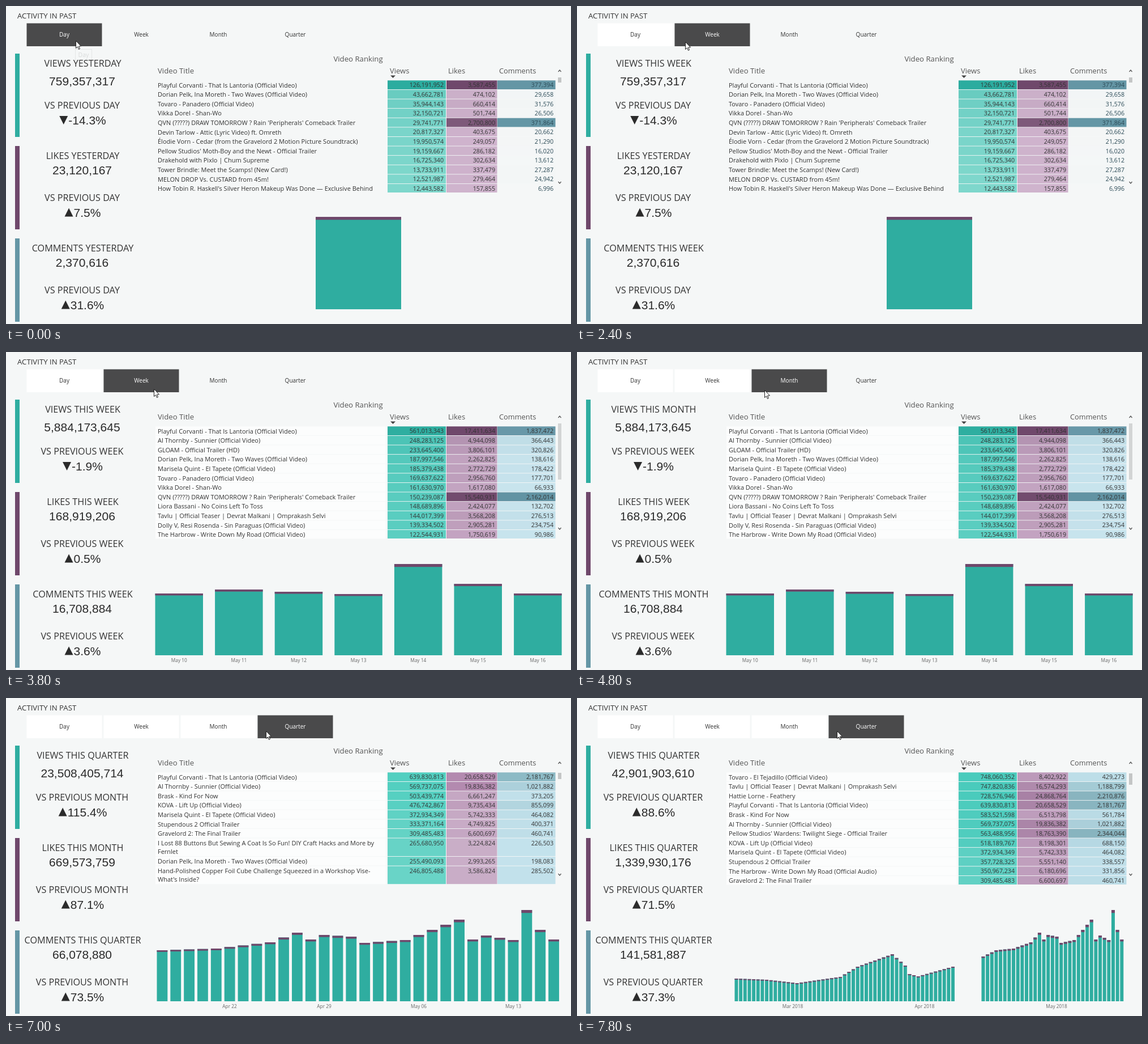
An HTML page with a canvas that plays this animation: 998x561 px, repeating every 8.2 s.

```html
<!DOCTYPE html>
<html lang="en">
<head>
<meta charset="utf-8">
<title>Video activity dashboard</title>
<style>
html, body { margin: 0; width: 100%; height: 100%; overflow: hidden; background: #f5f7f7; }
canvas { display: block; }
</style>
</head>
<body>
<canvas id="stage" width="998" height="561"></canvas>
<script>
const ctx = document.getElementById('stage').getContext('2d');
const LOOP = 8200, STEP = 200;
const UI = '"Open Sans", "Noto Sans", sans-serif';
const NUM = '"Liberation Sans", Arial, sans-serif';
const TEAL = '#2fada0', PLUM = '#6f486b', BLUE = '#6496a5';
const BASE = 535;

const song = 'Playful Corvanti - That Is Lantoria (Official Video)';
const waves = 'Dorian Pelk, Ina Moreth - Two Waves (Official Video)';
const band = "QVN (?????) DRAW TOMORROW ? Rain 'Peripherals' Comeback Trailer";
const sunny = 'Al Thornby - Sunnier (Official Video)';
const rug = 'Marisela Quint - El Tapete (Official Video)';
const teaser = 'Tavlu | Official Teaser | Devrat Malkani | Omprakash Selvi';
const baker = 'Tovaro - Panadero (Official Video)';
const rap = 'Vikka Dorel - Shan-Wo';
const kind = 'Brask - Kind For Now';
const lift = 'KOVA - Lift Up (Official Video)';
const hero = 'Stupendous 2 Official Trailer';

// rows that read the same for the month and the quarter
const songRow = song + ';639830813;20658529;2181767';
const sunnyRow = sunny + ';569737075;19836382;1021882';
const rugRow = rug + ';372934349;5742333;464082';
const lordRow = 'Gravelord 2: The Final Trailer;309485483;6600697;460741';

// each row: title; views; then likes and comments for the leading videos
const views = [
  {
    button: 'Day', period: 'YESTERDAY', prev: 'DAY', thumb: [126, 9],
    totals: ['759,357,317', '23,120,167', '2,370,616'], change: ['▼-14.3%', '▲7.5%', '▲31.6%'],
    shades: [['#80d8cd', '#2bac9f'], ['#d0b5ce', PLUM], ['#f5f7f7', BLUE]],
    rows: `${song};126191952;3587455;377394
${waves};43662781
${baker};35944143
${rap};32150721
${band};29741771;2700800;371864
Devin Tarlow - Attic (Lyric Video) ft. Omreth;20817327
Élodie Vorn - Cedar (from the Gravelord 2 Motion Picture Soundtrack);19950574
Pellow Studios' Moth-Boy and the Newt - Official Trailer;19159667
Drakehold with Pixlo | Chum Supreme;16725340
Tower Brindle: Meet the Scamps! (New Card!);13733911
MELON DROP Vs. CUSTARD from 45m!;12521987
How Tobin R. Haskell's Silver Heron Makeup Was Done — Exclusive Behind;12443582`
  },
  {
    button: 'Week', period: 'THIS WEEK', prev: 'WEEK', thumb: [126, 99],
    totals: ['5,884,173,645', '168,919,206', '16,708,884'], change: ['▼-1.9%', '▲0.5%', '▲3.6%'],
    shades: [['#62d3c6', '#2eaea0'], ['#c5a6c3', PLUM], ['#c8e4ed', '#6293a3']],
    rows: `${song};561013343;17411634;1837472
${sunny};248283125
GLOAM - Official Trailer (HD);233645400
${waves};187997546
${rug};185379438
${baker};169637622
${rap};161630970
${band};150239087;15540931;2162014
Liora Bassani - No Coins Left To Toss;148689896
${teaser};144017399
Dolly V, Resi Rosenda - Sin Paraguas (Official Video);139334502
The Harbrow - Write Down My Road (Official Video);122544931`
  },
  {
    button: 'Month', period: 'THIS MONTH', prev: 'MONTH', thumb: [132, 11],
    totals: ['23,508,405,714', '669,573,759', '66,078,880'], change: ['▲115.4%', '▲87.1%', '▲73.5%'],
    shades: [['#74d6ca', '#52cfc0'], ['#cbb0c9', '#b38aaf'], ['#c5e3ed', '#8dbac5']],
    rows: `${songRow}
${sunnyRow}
${kind};503439774
${lift};476742867
${rugRow}
${hero};333371164
${lordRow}
I Lost 88 Buttons But Sewing A Coat Is So Fun! DIY Craft Hacks and More by/Fernlet;265680950
${waves};255490093
Hand-Polished Copper Foil Cube Challenge Squeezed in a Workshop Vise-/What's Inside?;246805488`
  },
  {
    button: 'Quarter', period: 'THIS QUARTER', prev: 'QUARTER', thumb: [133, 20],
    totals: ['42,901,903,610', '1,339,930,176', '141,581,887'], change: ['▲88.6%', '▲71.5%', '▲37.3%'],
    shades: [['#70d5c9', '#4acbbc'], ['#c3a3c1', '#a881a5'], ['#c2e2ec', '#88b4bf']],
    rows: `Tovaro - El Tejadillo (Official Video);748060352
${teaser};747820836
Hattie Lorne - Feathery;728576946;24868764;2210876
${songRow}
${kind};583521598
${sunnyRow}
Pellow Studios' Wardens: Twilight Siege - Official Trailer;563488956;18763390;2344044
${lift};518189767
${rugRow}
${hero};357728325
The Harbrow - Write Down My Road (Official Audio);350967234
${lordRow}`
  }
];

const random = seed => {
  const n = Math.sin(seed * 12.9898) * 43758.5453;
  return n - Math.floor(n);
};

// missing likes are a seeded share of the views, missing comments a share of the likes
function parseRow(line, seed) {
  const [title, ...given] = line.split(';');
  const [seen, likes = seen * (0.01 + 0.015 * random(seed)),
    comments = likes * (0.04 + 0.05 * random(seed + 0.5))] = given.map(Number);
  return { lines: title.split('/'), counts: [seen, likes, comments].map(Math.round) };
}
views.forEach((v, i) => {
  v.rows = v.rows.split('\n').map((line, n) => parseRow(line, i * 20 + n + 1));
  v.peaks = [0, 1, 2].map(c => Math.max(...v.rows.map(r => r.counts[c])));
});

const cards = [
  { name: 'VIEWS', color: TEAL, y: 84, gap: 48 },
  { name: 'LIKES', color: PLUM, y: 247, gap: 42 },
  { name: 'COMMENTS', color: BLUE, y: 410, gap: 42 }
];
const columns = [[674, 103, 773], [778, 89.5, 864], [868, 102.5, 967]];

// bar tops at the turning points of the 90 days
const trend = [[0, 495], [7, 497], [14, 503], [24, 492], [28, 474], [36, 452], [39, 472], [40, 487], [42, 491],
  [50, 474], [57, 456], [60, 445], [64, 442], [68, 431], [70, 414], [71, 426], [72, 418], [74, 421], [75, 432],
  [78, 427], [82, 391], [83, 426], [84, 419], [86, 427], [87, 374], [88, 409], [89, 426]];
const pointerPath = [[600, 123, 61], [1800, 191, 63], [3200, 191, 63], [4400, 331, 67],
  [5000, 331, 67], [5600, 454, 55], [5800, 459, 58]];

const linear = k => k;
const smooth = k => k * k * (3 - 2 * k);
const stage = (t, marks) => marks.filter(m => t >= m).length;

// value in slot i of the keyed points at position p
function along(points, p, i = 1, ease = linear) {
  const n = points.findIndex(q => q[0] >= p);
  if (n === 0) return points[0][i];
  if (n < 0) return points[points.length - 1][i];
  const a = points[n - 1], b = points[n];
  return a[i] + (b[i] - a[i]) * ease((p - a[0]) / (b[0] - a[0]));
}

function box(x, y, w, h, color) {
  ctx.fillStyle = color;
  ctx.fillRect(x, y, w, h);
}

// y is the middle of the capitals
function text(s, x, y, size, color = '#333', align = 'left', font = UI) {
  ctx.font = size + 'px ' + font;
  ctx.textAlign = align;
  ctx.fillStyle = color;
  ctx.fillText(s, x, y + size * 0.36);
}

function triangle(x, y, w, h) {
  ctx.beginPath();
  ctx.moveTo(x, y);
  ctx.lineTo(x + w, y);
  ctx.lineTo(x + w / 2, y + h);
  ctx.fill();
}

function mix(a, b, k) {
  const part = (c, i) => parseInt(c.slice(1 + 2 * i, 3 + 2 * i), 16);
  return 'rgb(' + [0, 1, 2].map(i => Math.round(part(a, i) + (part(b, i) - part(a, i)) * k)) + ')';
}

function drawButtons(selected, hovered) {
  views.forEach((v, i) => {
    const x = 36.5 + i * 136, on = i === selected, over = i === hovered;
    let fill = i < selected ? '#fff' : '#f5f7f7';
    if (over) fill = '#dfdfe1';
    if (on) fill = over ? '#4a4a4b' : '#2d2d2d';
    box(x, 30.5, 133, 40.5, fill);
    text(v.button, x + 66.5, 50.5, 10, on ? '#fff' : over ? '#555' : '#333', 'center');
  });
}

function drawChange(s, y) {
  const up = s[0] === '▲', label = s.slice(1), mark = 16;
  ctx.font = '21px ' + NUM;
  const x = 135.5 - (mark + ctx.measureText(label).width) / 2;
  text(label, x + mark, y, 21, '#2b2b2b', 'left', NUM);
  triangle(x, y + (up ? 7.5 : -7), 15, up ? -15 : 15);
}

function drawCards(titled, shown) {
  const data = views[shown];
  cards.forEach((c, i) => {
    box(16, c.y, 8, 147, c.color);
    // the likes title is refreshed together with its value
    const period = views[i === 1 ? shown : titled].period;
    text(c.name + ' ' + period, 135.5, c.y + 16.7, 16.2, '#333', 'center');
    text(data.totals[i], 134.5, c.y + c.gap, 21, '#2b2b2b', 'center', NUM);
    text('VS PREVIOUS ' + data.prev, 134.5, c.y + 91.2, 16.2, '#333', 'center');
    drawChange(data.change[i], c.y + 117);
  });
}

function chevron(y, dir) {
  ctx.beginPath();
  ctx.moveTo(975.5, y + 1.5 * dir);
  ctx.lineTo(978, y - 1.5 * dir);
  ctx.lineTo(980.5, y + 1.5 * dir);
  ctx.strokeStyle = '#555';
  ctx.lineWidth = 1.3;
  ctx.stroke();
}

function drawTable(shown) {
  const { rows, shades, thumb, peaks } = views[shown];
  text('Video Ranking', 622, 93, 13.2, '#555', 'center');
  text('Video Title', 268, 114, 13.2, '#555');
  text('Views', 678, 114, 13, '#555');
  text('Likes', 781, 114, 13, '#555');
  text('Comments', 871, 114, 12.8, '#555');
  ctx.fillStyle = '#444';
  triangle(679, 122.5, 9, 4.5);

  let y = 131.3;
  for (const { lines, counts } of rows) {
    const h = lines.length > 1 ? 32.5 : 16.6;
    const mid = y + 8.3;
    if (shown) box(264, y, 407, h - 1, '#fcfdfd');
    lines.forEach((s, n) => text(s, 268, mid + n * 15.5, 11));
    columns.forEach(([x, w, right], i) => {
      const k = smooth(counts[i] / peaks[i]);
      box(x, y, w, Math.min(h - 0.9, 329 - y), mix(...shades[i], k));
      text(counts[i].toLocaleString('en-US'), right, mid, 10.7, i === 2 && !shown ? '#2b4a56' : '#333', 'right');
    });
    y += h;
  }
  chevron(114.5, 1);
  chevron(311.5, -1);
  box(975, thumb[0], 6, thumb[1], shown === 1 ? '#d3d5d5' : '#c4c6c6');
}

function bar(x, w, top) {
  box(x, top, w, BASE - top, TEAL);
  box(x, top, w, Math.max(2, (BASE - top) * 0.032), PLUM);
}

// bars for the days from first to last, starting at x
function bars(first, last, x, pitch, w) {
  for (let d = first; d <= last; d++) bar(x + (d - first) * pitch, w, along(trend, d));
}

function axis(labels, x, pitch) {
  labels.forEach((s, i) => text(s, x + i * pitch, 544.5, 8.3, '#666', 'center'));
}

const charts = [
  () => {
    bar(547, 151, 372);
    axis(['May 16'], 622);
  },
  () => {
    bars(83, 89, 263.5, 105.6, 84.5);
    axis([...Array(7).keys()].map(i => 'May ' + (10 + i)), 305.8, 105.6);
  },
  () => {
    bars(60, 89, 266.5, 23.85, 18.8);
    axis(['Apr 22', 'Apr 29', 'May 06', 'May 13'], 395, 167);
  },
  () => {
    bars(0, 50, 278.5, 7.65, 6);
    bars(57, 89, 714.5, 7.65, 6);
    axis(['Mar 2018', 'Apr 2018', 'May 2018'], 381, 233);
  }
];

function drawTooltip() {
  ctx.strokeStyle = '#e4e6e6';
  ctx.lineWidth = 1;
  ctx.strokeRect(122.5, 76.5, 29, 19);
  text('Day', 137, 86, 10.5, '#d9dbdb', 'center');
}

function drawPointer(x, y) {
  const shape = [[0, 0], [0, 13], [3, 10.3], [5, 15], [7, 14], [5, 9.6], [9, 9.4]];
  ctx.beginPath();
  shape.forEach(([dx, dy]) => ctx.lineTo(x + dx, y + dy));
  ctx.closePath();
  ctx.fillStyle = '#fff';
  ctx.strokeStyle = '#222';
  ctx.lineWidth = 1;
  ctx.fill();
  ctx.stroke();
}

function draw(time) {
  const t = Math.floor((time % LOOP) / STEP) * STEP;
  const selected = stage(t, [2200, 4600, 6800]);
  const titled = stage(t, [2400, 4800, 7000]);
  const shown = stage(t, [2600, 5000, 7200]);
  const px = along(pointerPath, t, 1, smooth), py = along(pointerPath, t, 2, smooth);

  box(0, 0, 998, 561, '#f5f7f7');
  text('ACTIVITY IN PAST', 20, 17.2, 13.2);
  drawButtons(selected, Math.floor((px - 36) / 136));
  if (t < STEP) drawTooltip();
  drawCards(titled, shown);
  drawTable(shown);
  charts[shown]();
  drawPointer(px + 0.5, py + 0.5);
}

const start = performance.now();
function tick() {
  draw(performance.now() - start);
  requestAnimationFrame(tick);
}
tick();
</script>
</body>
</html>
```
